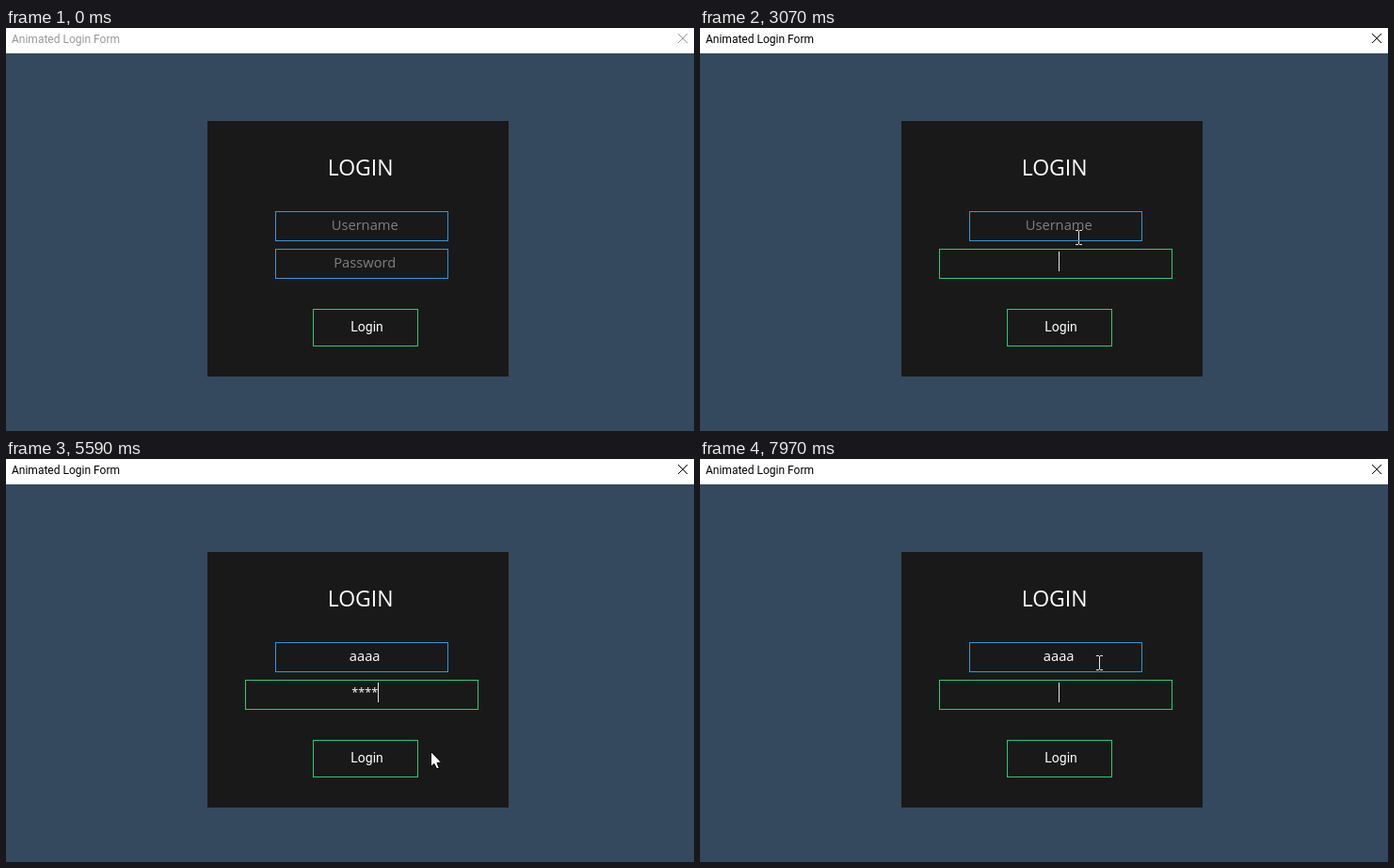
Recreate the animation shown at these times as an HTML page with a canvas. Size 731 by 429 pixels, loop 8 s.

```html
<!DOCTYPE html>
<html lang="en">
<head>
<meta charset="utf-8">
<title>Animated Login Form</title>
<style>
  html, body { margin: 0; width: 100%; height: 100%; overflow: hidden; background: #34495e; }
  canvas { display: block; }
</style>
</head>
<body>
<canvas id="stage" width="731" height="429"></canvas>
<script>
const ctx = document.getElementById('stage').getContext('2d');
const LOOP = 8000, TICK = 70, BLINK = 530, KEY_GAP = 150, KEYS = 4;
const BLUE = '#3498db', GREEN = '#2ecc71', DARK = '#191919', GREY = '#808080', WHITE = '#fff';
const LARGE = '"Open Sans", sans-serif', SMALL = 'Roboto, sans-serif';
const TEXT_X = 381.2;

const ENTRY = { x: 559, y: 386 };
const moves = [
  { from: 240, to: 1000, x: 432, y: 222 },
  { from: 1050, to: 1190, x: 430, y: 214 },
  { from: 1370, to: 1560, x: 423, y: 247 },
  { from: 1990, to: 2390, x: 402, y: 328 },
  { from: 2640, to: 3260, x: 402, y: 211 },
  { from: 4040, to: 4320, x: 404.5, y: 247 },
  { from: 5100, to: 5590, x: 451, y: 311 },
  { from: 5660, to: 6090, x: 431, y: 321 },
  { from: 6160, to: 6280, x: 390, y: 318 },
  { from: 6480, to: 7230, x: 324, y: 254 },
  { from: 7410, to: 7970, x: 424.5, y: 217 }
];

const ACTIVATE = 1050, USER_TYPING = 3570, PASS_TYPING = 4650, CLEAR = 6880;
const focusChanges = [
  [0, ''], [1120, 'user'], [1740, 'pass'], [3200, 'user'], [4500, 'pass'], [6020, ''], [CLEAR, 'pass']
];

const easeOut = p => 1 - (1 - p) ** 2;
const keyCount = (start, t) => Math.max(0, Math.min(KEYS, Math.floor((t - start) / KEY_GAP) + 1));
const isTyping = (start, t) => t >= start && t < start + (KEYS - 1) * KEY_GAP;

// The pointer eases from one resting place to the next in discrete ticks.
function pointerAt(t) {
  if (t < moves[0].from || isTyping(USER_TYPING, t) || isTyping(PASS_TYPING, t)) return null;
  const i = moves.filter(m => m.from <= t).length - 1;
  const move = moves[i], start = moves[i - 1] || ENTRY;
  const elapsed = Math.floor((t - move.from + 5) / TICK) * TICK;
  const p = t >= move.to ? 1 : easeOut(Math.min(1, elapsed / (move.to - move.from)));
  return { x: start.x + (move.x - start.x) * p, y: start.y + (move.y - start.y) * p };
}

function caretVisible(t, focusTime) {
  const keyTimes = [USER_TYPING, PASS_TYPING].map(s => {
    const n = keyCount(s, t);
    return n ? s + (n - 1) * KEY_GAP : 0;
  });
  return Math.floor((t - Math.max(focusTime, ...keyTimes)) / BLINK) % 2 === 0;
}

function rect(x, y, w, h, color) {
  ctx.fillStyle = color;
  ctx.fillRect(x, y, w, h);
}

function frame(x, y, w, h, color) {
  ctx.strokeStyle = color;
  ctx.lineWidth = 1;
  ctx.strokeRect(x + 0.5, y + 0.5, w - 1, h - 1);
}

function label(str, x, y, size, family, color, align = 'center') {
  ctx.font = `${size}px ${family}`;
  ctx.textAlign = align;
  ctx.fillStyle = color;
  ctx.fillText(str, x, y);
}

function drawTitleBar(active) {
  const color = active ? '#000' : '#999';
  rect(0, 0, 731, 27, WHITE);
  label('Animated Login Form', 6, 16, 12, SMALL, color, 'left');
  ctx.strokeStyle = color;
  ctx.lineWidth = 1;
  ctx.beginPath();
  ctx.moveTo(714, 6);
  ctx.lineTo(724, 16);
  ctx.moveTo(724, 6);
  ctx.lineTo(714, 16);
  ctx.stroke();
}

const fieldBox = (y, focused) => focused ? [254, y, 248, 32] : [286, y, 184, 32];

function drawField(y, hint, value, focused, caretOn, masked) {
  frame(...fieldBox(y, focused), focused ? GREEN : BLUE);
  if (value) label(value, TEXT_X, y + (masked ? 17.5 : 20), masked ? 12.7 : 14.7, LARGE, WHITE);
  else if (!focused) label(hint, TEXT_X, y + 20, 14.7, LARGE, GREY);
  if (focused && caretOn) {
    const half = value ? ctx.measureText(value).width / 2 : 0;
    rect(Math.floor(TEXT_X + half), y + 3, 1, 21, '#e6e6e6');
  }
}

function drawButton(hover) {
  if (hover) rect(326, 299, 112, 40, GREEN);
  else frame(326, 299, 112, 40, GREEN);
  label('Login', 383.5, 323, 14, SMALL, WHITE);
}

function drawArrow(x, y) {
  const shape = [[0, 0], [0, 16], [3.5, 13], [6, 18], [8.5, 18], [8.5, 17], [6.5, 12], [11, 11.5]];
  ctx.beginPath();
  shape.forEach(([dx, dy]) => ctx.lineTo(x + dx + 0.5, y + dy + 0.5));
  ctx.closePath();
  ctx.fillStyle = WHITE;
  ctx.fill();
  ctx.strokeStyle = '#000';
  ctx.lineWidth = 1;
  ctx.stroke();
}

function drawBeam(x, y) {
  ctx.globalCompositeOperation = 'difference';
  rect(x, y - 7, 1, 14, WHITE);
  for (const dy of [-8, 7]) {
    rect(x - 3, y + dy, 3, 1, WHITE);
    rect(x + 1, y + dy, 3, 1, WHITE);
  }
  ctx.globalCompositeOperation = 'source-over';
}

function draw(t) {
  const [focusTime, focus] = focusChanges.filter(f => f[0] <= t).pop();
  const onUser = focus === 'user', onPass = focus === 'pass';
  const caretOn = caretVisible(t, focusTime);
  const pointer = pointerAt(t);
  const over = (x, y, w, h) =>
    pointer && pointer.x >= x && pointer.x < x + w && pointer.y >= y && pointer.y < y + h;
  const username = 'a'.repeat(keyCount(USER_TYPING, t));
  const password = t < CLEAR ? '*'.repeat(keyCount(PASS_TYPING, t)) : '';

  rect(0, 0, 731, 429, '#34495e');
  drawTitleBar(t >= ACTIVATE);
  rect(214, 99, 320, 272, DARK);
  label('LOGIN', 376.6, 157, 23, LARGE, WHITE);
  drawField(195, 'Username', username, onUser, caretOn, false);
  drawField(235, 'Password', password, onPass, caretOn, true);
  drawButton(over(326, 299, 112, 40));

  if (!pointer) return;
  const overText = over(...fieldBox(195, onUser)) || over(...fieldBox(235, onPass));
  if (overText) drawBeam(Math.floor(pointer.x), Math.round(pointer.y));
  else drawArrow(Math.round(pointer.x), Math.round(pointer.y));
}

const begin = performance.now();
function tick() {
  draw((performance.now() - begin) % LOOP);
  requestAnimationFrame(tick);
}
tick();
</script>
</body>
</html>
```
